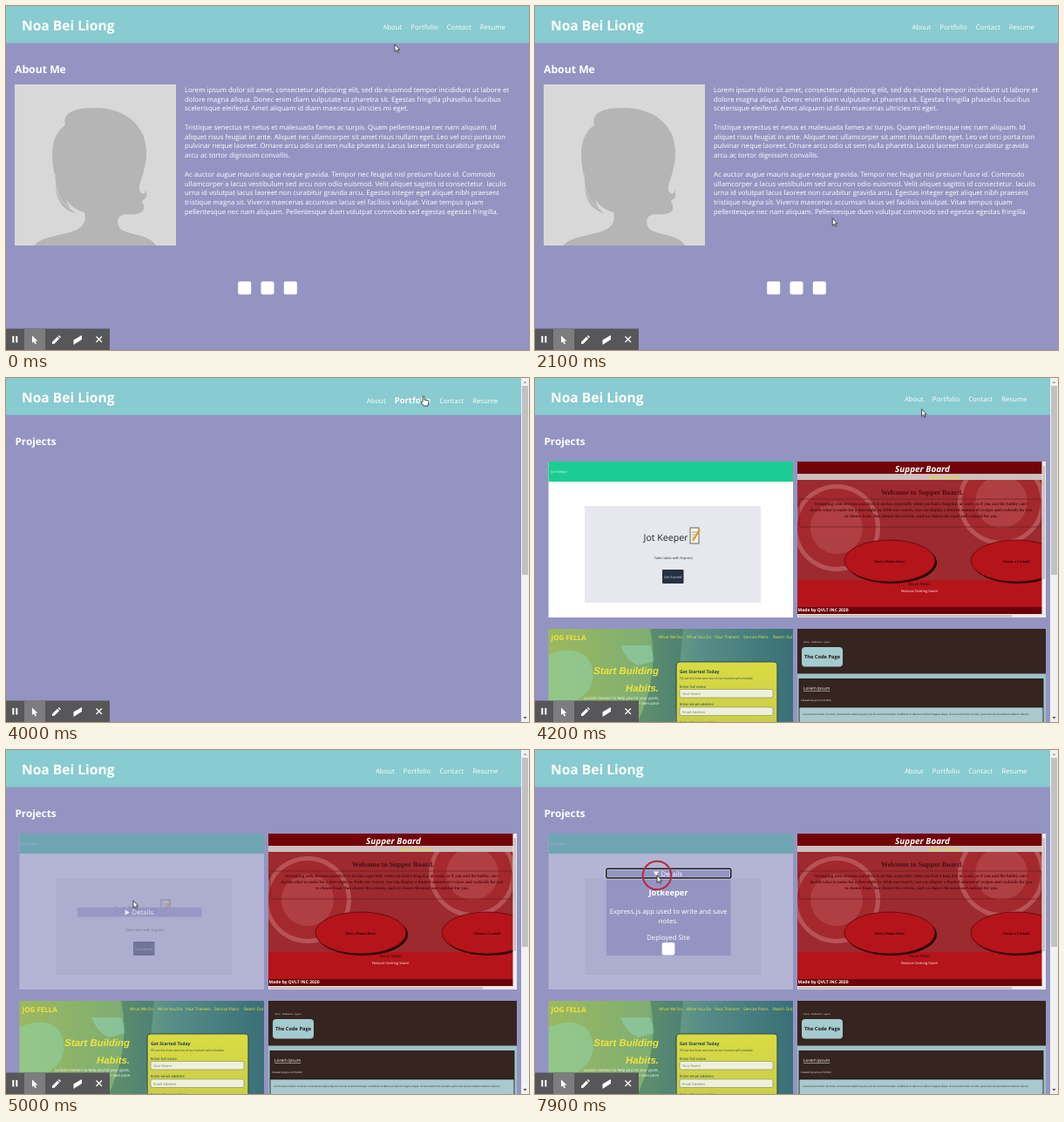
These frames come from a looping animation (600 by 395 pixels, 8000 ms). An HTML page:

```html
<!DOCTYPE html>
<html lang="en">
<head>
<meta charset="utf-8">
<title>Portfolio walkthrough</title>
<style>
html, body { margin: 0; width: 100%; height: 100%; overflow: hidden; background: #9494c2; }
svg { display: block; width: 600px; height: 395px; fill: #fff;
  font-family: "Open Sans", "Noto Sans", sans-serif; text-rendering: geometricPrecision; }
.b { font-weight: 700; }
.i { font-style: italic; }
.m { text-anchor: middle; }
.e { text-anchor: end; }
.serif { font-family: "Liberation Serif", serif; }
.arial { font-family: "Liberation Sans", sans-serif; }
#nav .on { font-weight: 700; font-size: 9.5px; }
</style>
</head>
<body>
<svg id="stage" viewBox="0 0 600 395"></svg>
<script>
const PURPLE = '#9494c2';
const text = (s, x, y, size, attrs = '') => `<text x="${x}" y="${y}" font-size="${size}" ${attrs}>${s}</text>`;
const rect = (x, y, w, h, fill, attrs = '') => `<rect x="${x}" y="${y}" width="${w}" height="${h}" fill="${fill}" ${attrs}/>`;
const path = (d, attrs = '') => `<path d="${d}" ${attrs}/>`;
const lines = (all, x, y, step, size, attrs) => all.split('\n').map((s, i) => text(s, x, y + i * step, size, attrs)).join('');

const bio = `Lorem ipsum dolor sit amet, consectetur adipiscing elit, sed do eiusmod tempor incididunt ut labore et
dolore magna aliqua. Donec enim diam vulputate ut pharetra sit. Egestas fringilla phasellus faucibus
scelerisque eleifend. Amet aliquam id diam maecenas ultricies mi eget.

Tristique senectus et netus et malesuada fames ac turpis. Quam pellentesque nec nam aliquam. Id
aliquet risus feugiat in ante. Aliquet nec ullamcorper sit amet risus nullam eget. Leo vel orci porta non
pulvinar neque laoreet. Ornare arcu odio ut sem nulla pharetra. Lacus laoreet non curabitur gravida
arcu ac tortor dignissim convallis.

Ac auctor augue mauris augue neque gravida. Tempor nec feugiat nisl pretium fusce id. Commodo
ullamcorper a lacus vestibulum sed arcu non odio euismod. Velit aliquet sagittis id consectetur. Iaculis
urna id volutpat lacus laoreet non curabitur gravida arcu. Egestas integer eget aliquet nibh praesent
tristique magna sit. Viverra maecenas accumsan lacus vel facilisis volutpat. Vitae tempus quam
pellentesque nec nam aliquam. Pellentesque diam volutpat commodo sed egestas egestas fringilla.`;

const aboutPage = text('About Me', 10, 77, 12.2, 'class="b"') +
  rect(10, 90, 185, 185, '#d8d8d8') +
  path(`M33 275C38 266 60 264 76 259C90 254 92 247 90 237C82 235 74 230 69 222C71 230 75 235 80 238
    C66 235 57 222 57 206C57 196 53 186 53 170C53 156 58 143 68 137C64 122 80 117 100 117
    C126 116 150 128 158 150C163 166 161 178 158 189C157 197 152 204 153 211C155 217 160 217 160 211
    C163 217 161 221 157 223C154 225 159 227 158 231C159 239 147 240 138 239C127 240 126 248 131 256
    C140 263 165 262 172 275Z`, 'fill="#b5b5b5"') +
  path('M56 192C56 212 62 227 76 234', 'fill="none" stroke="#d8d8d8" stroke-width=".7"') +
  lines(bio, 205, 98.8, 10.78, 7.81) +
  '<g id="icons">' + rect(0, 0, 15, 15, '#fff', 'rx="2"').repeat(3) + '</g>';

const notesCard = rect(15.5, 96, 280.5, 179, '#fff') +
  rect(15.5, 96, 280.5, 23, '#1ccd93') +
  text('Jot Keeper', 18, 109, 4, 'fill="#d5f0e8"') +
  rect(57, 147, 202, 111, '#e6e8ee') +
  text('Jot Keeper', 150, 187, 10.6, 'class="m" fill="#222"') +
  rect(178, 172, 10, 18, '#f6f3e4', 'stroke="#444" stroke-width=".8"') +
  path('M180 177H186M180 180H186M180 183H185', 'stroke="#777" stroke-width=".7"') +
  path('M181 187L189 174', 'stroke="#e09a20" stroke-width="2"') +
  text('Take notes with Express', 159, 207.5, 4, 'class="m" fill="#333"') +
  rect(146, 220, 24.5, 16, '#27313f', 'rx="1"') +
  text('Get Started', 158.2, 229.5, 3.9, 'class="m" fill="#cfe0ff"');

const button = (x, label) => `<ellipse cx="${x + 2}" cy="212" rx="52" ry="24" fill="#2a0507"/>` +
  `<ellipse cx="${x}" cy="210" rx="52" ry="24" fill="#b5141a" stroke="#4a0709" stroke-width=".7"/>` +
  text(label, x, 211.5, 4, 'class="m serif b" fill="#1d0304"');

const bowl = (x, y, r) => `<circle cx="${x}" cy="${y}" r="${r}" fill="#b75356"/>` +
  `<circle cx="${x}" cy="${y}" r="${r - 5}" fill="#a3292e"/>` +
  `<circle cx="${x}" cy="${y}" r="${r * .6}" fill="#b03f43"/>`;

const pitch = `Struggling with decision paralysis is no fun, especially when you had a long day at work, or if you and the hubby can't
decide what to make for a date night in. With our search, you can display a limited amount of recipes and cocktails for you
to choose from. You choose the criteria, and we choose the meal and cocktail for you.`;

const menuCard = '<g clip-path="url(#menuClip)">' + rect(301, 96, 285, 179, '#9c2a2f') +
  bowl(346, 172, 50) + bowl(535, 142, 50) +
  rect(301, 110, 285, 7, '#cdbfbf') +
  text('[Other Recipes]', 470, 116, 5, 'class="m b i" fill="#e0d43a"') +
  rect(301, 96, 285, 14, '#720409') +
  text('Supper Board', 444.5, 107.6, 9.9, 'class="m b i"') +
  text('Welcome to Supper Board.', 444, 133.5, 8.2, 'class="m b serif" fill="#4a0d10"') +
  rect(303, 139, 278, 32, 'none', 'rx="2" stroke="#6a1a1d" stroke-width=".7"') +
  lines(pitch, 443, 146, 6.8, 4.9, 'class="m b serif" fill="#4a0d10"') +
  rect(301, 232, 281, 31, '#b5141a') +
  button(407, 'Find a Dinner Here!') + button(552, 'Choose a Cocktail') +
  text('Secret Meals', 441, 237.5, 4.8, 'class="m serif" fill="#26090a"') +
  text('Feature Coming Soon!', 441, 245.5, 4.1, 'class="m"') +
  rect(301, 263, 281, 8, '#690408') +
  text('Made by QVLT INC 2020', 301.5, 268.2, 5, 'class="b"') +
  rect(301, 271, 285, 4, '#efe6e6') + rect(302, 272, 245, 2.5, '#c9bcbc') +
  rect(581.5, 96, 4.5, 179, '#f1eeee') + rect(582.5, 101, 2.5, 130, '#c5c0c0') + '</g>';

const fitnessCard = rect(15.5, 288, 280.5, 107, 'url(#field)') +
  path('M15.5 318C40 308 62 312 66 335C70 360 50 375 15.5 380Z', 'fill="#8fd0a4" opacity=".6"') +
  path('M98 307H132L138 325L118 330C106 325 102 316 98 307Z', 'fill="#8fd0b0" opacity=".6"') +
  path('M132 288H170L160 395H118C134 360 140 325 132 288Z', 'fill="#3a6f66" opacity=".5"') +
  text('JOG FELLA', 18.5, 300.5, 8, 'class="b" fill="#f0e53c"') +
  ['What We Do', 'What You Do', 'Your Trainers', 'Service Plans', 'Reach Out']
    .map((s, i) => text(s, [142, 174, 206, 239, 273][i], 299.3, 4.7, 'fill="#f0e53c"')).join('') +
  lines('Start Building\nHabits.', 142, 340, 20, 11.4, 'class="e b i arial" fill="#f0e53c"') +
  lines('custom trainers to help you hit your goals,\nbuilt to suit your day and your own pace', 142, 369, 6, 4.4, 'class="e"') +
  rect(162, 326, 116, 75, 'url(#form)', 'rx="4" stroke="#2d4f50" stroke-width="1.2"') +
  text('Get Started Today', 166, 338.5, 5.1, 'class="b" fill="#17404a"') +
  text('Fill out the form and one of our trainers will schedule', 166, 345.5, 3.4, 'fill="#17404a"') +
  ['Enter full name', 'Enter email address', 'Enter phone number']
    .map((s, i) => text(s, 166, 355.7 + i * 20.5, 4.2, 'fill="#17404a"')).join('') +
  ['Your Name', 'Email Address'].map((s, i) =>
    rect(166, 357.5 + i * 20.5, 107, 9.5, '#eff0dc', 'rx="2" stroke="#7f8c55" stroke-width=".6"') +
    text(s, 169, 364 + i * 20.5, 4, 'fill="#777"')).join('');

const blogCard = rect(301, 288, 285, 107, '#9fc2c6') +
  rect(301, 288, 285, 51.5, '#35241f') +
  text('Home &#160; Dashboard &#160; Logout', 308, 303.5, 2.4) +
  rect(306, 309, 47, 22.5, '#a4cbcf', 'rx="4"') +
  text('The Code Page', 329.5, 322, 5.7, 'class="m b" fill="#231815"') +
  rect(303, 345.5, 280, 32.5, '#35241f', 'stroke="#1d1512" stroke-width=".8"') +
  text('Lorem Ipsum', 308, 358, 4.9, 'text-decoration="underline"') +
  text('Created by Juno on 5/2020', 305, 371, 2.8) +
  rect(303, 378, 280, 20, '#a9c9cd', 'stroke="#1d1512" stroke-width=".8"') +
  text('Lorem ipsum dolor sit amet, consectetur adipiscing elit, sed do eiusmod tempor incididunt ut labore et dolore magna aliqua. Ut enim ad minim veniam, quis nostrud exercitation ullamco laboris', 307, 387, 2.9, 'fill="#2d2a2a"');

const details = '<g id="details">' +
  `<g id="panel">${rect(82, 136, 142.5, 100, PURPLE)}` +
  text('Jotkeeper', 153, 167, 9.3, 'class="m b"') +
  lines('Express.js app used to write and save\nnotes.', 153, 187.7, 10.8, 7.75, 'class="m"') +
  text('Deployed Site', 153, 217.6, 7.75, 'class="m"') +
  rect(145.7, 221, 14.6, 14.6, '#fff', 'rx="2" id="repo"') + '</g>' +
  '<g id="summary">' + rect(82, 136.3, 142.5, 10.8, PURPLE) +
  '<g id="focus">' + rect(81.8, 136.3, 143, 10.8, 'none', 'rx="1.5" stroke="#e4e4f2" stroke-width="2.6"') +
  rect(81.8, 136.3, 143, 10.8, 'none', 'rx="1.5" stroke="#111" stroke-width="1.5"') + '</g>' +
  path('M-3 -2.4H3L0 2.8Z', 'id="marker"') + text('Details', 144.6, 144.9, 7.75) + '</g></g>';

const projectsPage = text('Projects', 10.5, 77, 11.7, 'class="b"') +
  `<g id="cards"><g id="shot">${notesCard}</g>${details}${menuCard}${fitnessCard}${blogCard}</g>` +
  rect(591, 0, 9, 395, '#f1f1f1') + rect(592, 9, 7, 217, '#c1c1c1') +
  path('M593.5 6L595.5 3.5L597.5 6Z', 'fill="#a3a3a3"') + path('M593.5 389L595.5 391.5L597.5 389Z', 'fill="#505050"');

const toolbar = rect(0, 370.5, 119, 24.5, '#57575a') + rect(21, 370.5, 24, 24.5, '#7d7d80') +
  rect(7.3, 379, 2, 7.5, '#fff') + rect(11.3, 379, 2, 7.5, '#fff') +
  path('M30 378.5V387L32 385.2L33.5 388.5L35 387.8L33.5 384.7H36.3Z') +
  path('M53 388V385.7L59 379.7L61.3 382L55.3 388ZM59.8 379L60.8 378L63 380.2L62 381.2Z') +
  path('M77.5 383.5L87 378V383L77.5 389Z') +
  path('M103.5 379.5L110 386M110 379.5L103.5 386', 'stroke="#fff" stroke-width="1.3"');

const stage = document.getElementById('stage');
stage.innerHTML = `<defs>
  <linearGradient id="field"><stop stop-color="#9cb860"/><stop offset=".4" stop-color="#7fae72"/><stop offset=".6" stop-color="#5a9088"/><stop offset="1" stop-color="#3a6f78"/></linearGradient>
  <linearGradient id="form" x2="0" y2="1"><stop stop-color="#dadb42"/><stop offset="1" stop-color="#c9cd4c"/></linearGradient>
  <clipPath id="menuClip">${rect(301, 96, 285, 179, '#000')}</clipPath></defs>` +
  rect(0, 0, 600, 395, PURPLE) + rect(0, 0, 600, 42.5, '#88cbd0') +
  text('Noa Bei Liong', 18, 28, 15.6, 'class="b"') +
  '<text id="nav" class="e" font-size="7.8">' +
  ['About', 'Portfolio', 'Contact', 'Resume'].map((s, i) => `<tspan dx="${i ? 10 : 0}">${s}</tspan>`).join('') + '</text>' +
  `<g id="about">${aboutPage}</g><g id="projects">${projectsPage}</g>${toolbar}` +
  '<g id="cursor" stroke="#222" stroke-width=".8" stroke-linejoin="round">' +
  '<circle id="ring" r="16.3" fill="none" stroke="#b8283c" stroke-width="2"/>' +
  path('M0 0V8.4L1.9 6.6L3.2 9.5L4.5 8.9L3.2 6.1H5.7Z', 'id="arrow"') +
  path('M-1 0.6C-1 -.6 .8 -.6 .8 .6V4L5 4.8C6 5 6 6 5.8 7L5 11H.2L-2.8 7C-3.2 6 -2 5.6 -1 6.6Z', 'id="hand"') + '</g>';

const $ = id => document.getElementById(id);
const show = (id, on) => $(id).setAttribute('visibility', on ? 'inherit' : 'hidden');
const set = (el, attrs) => Object.entries(attrs).forEach(([k, v]) => el.setAttribute(k, v));
const ramp = (t, a, b) => Math.min(1, Math.max(0, (t - a) / (b - a)));

// Pointer stops: time, x, y
const stops = [[0, 446, 44], [100, 446, 44], [900, 271, 331], [1100, 271, 331], [1300, 300, 329], [1400, 300, 329],
  [1700, 328, 328], [1900, 328, 328], [2500, 379, 3], [2600, 379, 3], [3100, 436, 25], [3300, 436, 25],
  [3500, 479, 21], [4100, 479, 21], [4600, 138, 163], [5000, 146, 173], [5200, 144, 190], [5600, 140, 187],
  [6200, 140, 187], [6500, 152, 226], [6700, 152, 226], [7400, 142, 152], [7600, 140, 144], [8000, 140, 144]];

function pointer(t) {
  const n = stops.findIndex(s => s[0] > t);
  const [a, x, y] = stops[n - 1], [b, u, v] = stops[n];
  const k = ramp(t, a, b), p = k * k * (3 - 2 * k);
  return [x + (u - x) * p, y + (v - y) * p];
}

// Index of the first [start, end) span that holds t, or -1
const within = (t, spans) => spans.findIndex(([a, b]) => t >= a && t < b);

function draw(t) {
  const onProjects = t >= 3800, open = t >= 6000;
  show('about', !onProjects);
  show('projects', onProjects);

  const link = within(t, [[3100, 3400], [3400, 4200]]);
  set($('nav'), { x: onProjects ? 564.5 : 573, y: link < 0 ? 27 : 29.4 });
  [...$('nav').children].forEach((s, i) => s.setAttribute('class', i === link ? 'on' : ''));

  const icon = within(t, [[900, 1200], [1200, 1600], [1600, 2100]]);
  const bottom = icon < 0 ? 331.2 : 333.7;
  let x = icon < 0 ? 266.2 : 264.9;
  [...$('icons').children].forEach((r, i) => {
    const size = i === icon ? 17.6 : 15;
    set(r, { x, y: bottom - size, width: size, height: size });
    x += size + 11.3;
  });

  show('cards', onProjects && t >= 4200);
  set($('shot'), { opacity: 1 - .7 * ramp(t, 4370, 4860) });
  set($('details'), { opacity: ramp(t, 4600, 5100) });
  show('panel', open && onProjects);
  show('focus', open && onProjects);
  set($('summary'), { transform: `translate(0 ${open ? 0 : 44.5})` });
  set($('marker'), { transform: `translate(139 142) rotate(${open ? 0 : -90})` });
  const repoHover = t >= 6500 && t < 7000;
  set($('repo'), repoHover ? { x: 144.6, width: 16.8, height: 16.8 } : { x: 145.7, width: 14.6, height: 14.6 });

  const [px, py] = pointer(t);
  const hand = link >= 0 || icon >= 0 || (t >= 6400 && t < 7000);
  const pointing = t < 6000 || t >= 6300;
  set($('cursor'), { transform: `translate(${px} ${py})` });
  show('arrow', pointing && !hand);
  show('hand', hand);
  show('ring', within(t, [[3600, 3800], [5800, 6000], [7700, 8000]]) >= 0);
}

function tick(now) {
  draw(Math.floor(now % 8000 / 100) * 100);
  requestAnimationFrame(tick);
}
draw(0);
requestAnimationFrame(tick);
</script>
</body>
</html>
```
